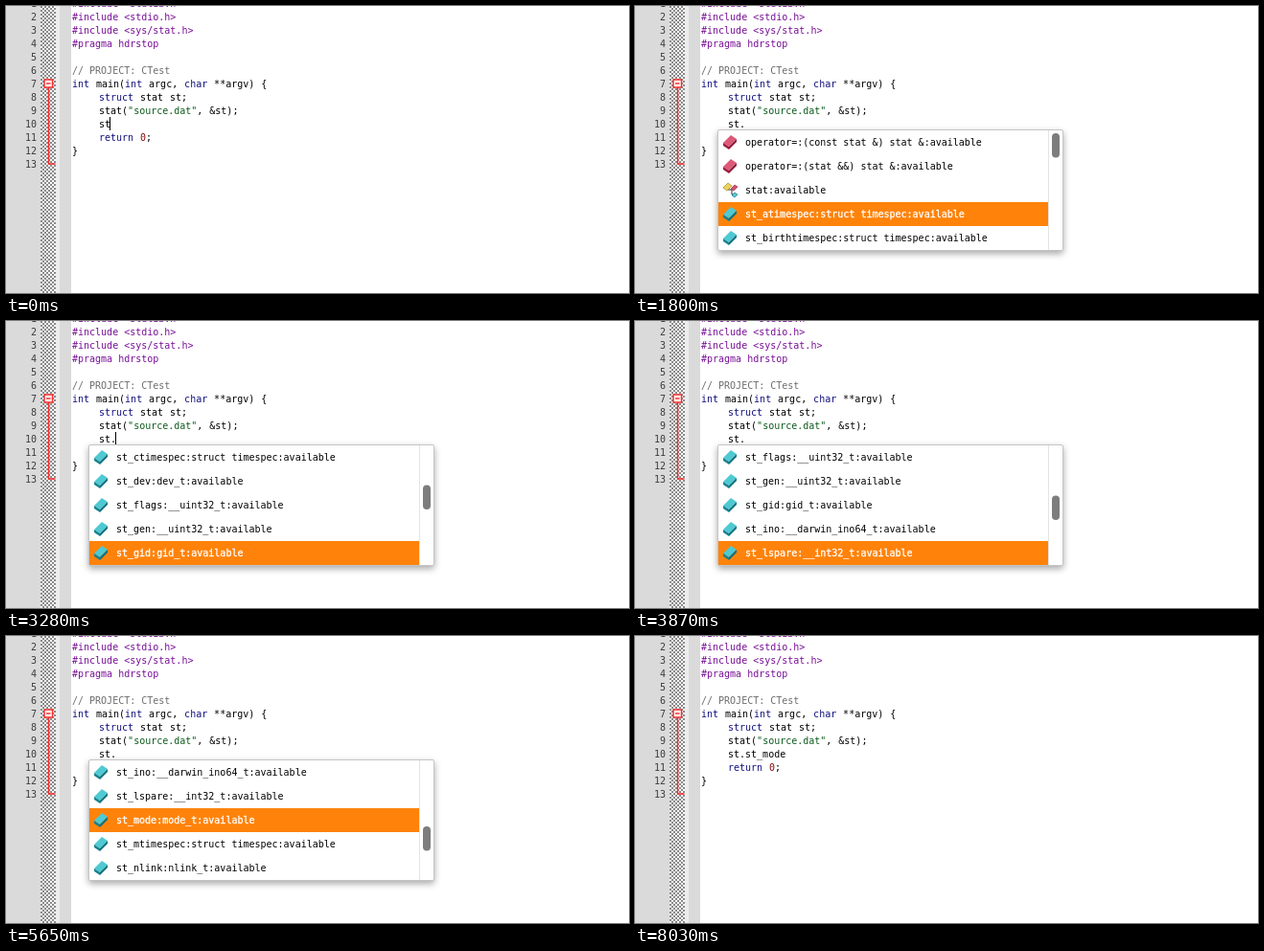
Animation, 650 px wide and 300 px high, one loop 8.05 s. Source, as an HTML page:

```html
<!DOCTYPE html>
<html lang="en">
<head>
<meta charset="utf-8">
<title>Code completion</title>
<style>
  html, body { margin: 0; width: 100%; height: 100%; overflow: hidden; background: #fff; }
  svg { display: block; width: 650px; height: 300px; }
  text { font: 10px "DejaVu Sans Mono", monospace; fill: #000; }
  .num { text-anchor: end; fill: #3c3c3c; }
  .code { word-spacing: .9px; }
  .pre { fill: #780f96; word-spacing: 0; }
  .note { fill: #6e6e6e; word-spacing: 0; }
  .key { fill: #10107f; }
  .str { fill: #0c5a1c; }
  .lit { fill: #8b0a0a; }
  .row.on text { fill: #fff; stroke: #fff; stroke-width: .3px; }
  .fold { fill: none; stroke: #f52f2f; stroke-width: 1.5; }
  #panel { filter: drop-shadow(0 3px 3.5px rgba(0, 0, 0, .34)); }
</style>
</head>
<body>
<svg viewBox="0 0 650 300">
  <defs>
    <pattern id="check" x="36" width="4" height="4" patternUnits="userSpaceOnUse">
      <rect width="4" height="4" fill="#fafafa"/>
      <path d="M0 0h2v2h-2zM2 2h2v2h-2z" fill="#8a8a8a"/>
    </pattern>
    <clipPath id="view"><rect x="87" y="130" width="344" height="125"/></clipPath>
    <g id="method">
      <path d="M92 143L100 135L106 139L98 147Z" fill="#dc5a78"/>
      <path d="M92 143L98 147V150L92 146Z" fill="#a01c40"/>
      <path d="M98 147L106 139V142L98 150Z" fill="#8a1836"/>
    </g>
    <g id="field">
      <path d="M92 143L100 135L106 139L98 147Z" fill="#4fc9d2"/>
      <path d="M92 143L98 147V150L92 146Z" fill="#16838f"/>
      <path d="M98 147L106 139V142L98 150Z" fill="#0f6f7c"/>
    </g>
    <g id="type">
      <path d="M97 142H101V147H104" fill="none" stroke="#333"/>
      <path d="M92 140L97 135L101 138L96 143Z" fill="#ecd35a" stroke="#a58a1e" stroke-width=".7"/>
      <path d="M100 141L104 137L107 139L103 143Z" fill="#d64f72" stroke="#8a1836" stroke-width=".6"/>
      <path d="M101 148L104 145L107 147L104 150Z" fill="#4fc9d2" stroke="#0f6f7c" stroke-width=".6"/>
    </g>
  </defs>

  <rect width="650" height="300" fill="#fff"/>
  <rect width="68" height="300" fill="#dadada"/>
  <rect x="36" width="16" height="300" fill="url(#check)"/>
  <rect x="52" width="4" height="300" fill="#ececec"/>
  <path class="fold" d="M44.5 85V165H51.5"/>
  <rect class="fold" x="40" y="77" width="8.5" height="8" style="fill:#fff"/>
  <path class="fold" d="M42 81H46.5"/>

  <g id="editor"></g>
  <rect id="caret" y="116" width="1" height="14"/>

  <g id="popup">
    <rect id="panel" x="86.5" y="129.5" width="360" height="126" rx="1.5" fill="#fff" stroke="#c4c4c4"/>
    <rect id="bar" x="87" width="344" height="25" fill="#ff830a"/>
    <g clip-path="url(#view)"><g id="list"></g></g>
    <path d="M431.5 130V255" stroke="#e4e4e4"/>
    <rect id="thumb" x="435" width="8" height="25.5" rx="4" fill="#7d7d7d"/>
  </g>
</svg>

<script>
const LOOP = 8050, OPEN = 750, CLOSE = 5790, ROW = 25, VISIBLE = 5;
const DOWN = [1500, 1650, 1800, 1950, 2100, 2250, 2400, 2840, 2990, 3130,
              3280, 3430, 3870, 4320, 4460, 4610];
const UP = [5050, 5200];
const BLINK = [750, 1200, 1800, 2250, 2690, 3280, 3730, 4170, 4610,
               5200, 5650, 6090, 6690, 7140, 7590];
const TYPED = [[0, 'st'], [150, 'st.'], [CLOSE, 'st.st_mode']];

// Each line: x, then [class, text] runs
const LINES = [
  [69, ['pre', '#include <stdlib.h>']],
  [69, ['pre', '#include <stdio.h>']],
  [69, ['pre', '#include <sys/stat.h>']],
  [69, ['pre', '#pragma hdrstop']],
  [69],
  [69, ['note', '// PROJECT: CTest']],
  [69, ['key', 'int'], ['', ' main('], ['key', 'int'], ['', ' argc, '], ['key', 'char'], ['', ' **argv) {']],
  [97, ['key', 'struct'], ['', ' stat st;']],
  [97, ['', 'stat('], ['str', '"source.dat"'], ['', ', &st);']],
  [97, ['', 'st']],
  [97, ['key', 'return'], ['', ' '], ['lit', '0'], ['', ';']],
  [69, ['', '}']],
  [69]
];

const ITEMS = [
  'operator=:(const stat &) stat &', 'operator=:(stat &&) stat &', 'stat',
  'st_atimespec:struct timespec', 'st_birthtimespec:struct timespec',
  'st_blksize:blksize_t', 'st_blocks:blkcnt_t', 'st_ctimespec:struct timespec',
  'st_dev:dev_t', 'st_flags:__uint32_t', 'st_gen:__uint32_t', 'st_gid:gid_t',
  'st_ino:__darwin_ino64_t', 'st_lspare:__int32_t', 'st_mode:mode_t',
  'st_mtimespec:struct timespec', 'st_nlink:nlink_t'
];

const $ = id => document.getElementById(id);

function add(parent, tag, attrs, content) {
  const el = document.createElementNS('http://www.w3.org/2000/svg', tag);
  for (const key in attrs) el.setAttribute(key, attrs[key]);
  if (content !== undefined) el.textContent = content;
  return parent.appendChild(el);
}

const lineTexts = LINES.map(([x, ...runs], i) => {
  const y = 1 + 14 * i;
  add($('editor'), 'text', { class: 'num', x: 32, y }, i + 1);
  const line = add($('editor'), 'text', { class: 'code', x, y, style: 'white-space:pre' });
  for (const [cls, str] of runs) add(line, 'tspan', { class: cls }, str);
  return line;
});
const typedRun = lineTexts[9].firstChild;

const rows = ITEMS.map((item, i) => {
  const row = add($('list'), 'g', { class: 'row', transform: `translate(0 ${i * ROW})` });
  const icon = i < 2 ? 'method' : i === 2 ? 'type' : 'field';
  add(row, 'use', { href: '#' + icon });
  add(row, 'text', { x: 115, y: 146 }, item + ':available');
  return row;
});

const passed = (times, t) => times.filter(time => time <= t).length;

function draw(t) {
  const typed = TYPED.filter(([time]) => time <= t).pop()[1];
  if (typedRun.textContent !== typed) typedRun.textContent = typed;
  $('caret').setAttribute('x', 96 + 6 * typed.length);
  $('caret').style.display = passed(BLINK, t) % 2 ? 'none' : '';

  const open = t >= OPEN && t < CLOSE;
  $('popup').style.display = open ? '' : 'none';
  if (!open) return;
  const lowest = passed(DOWN, t);
  const selected = lowest - passed(UP, t);
  const top = Math.max(0, lowest - VISIBLE + 1);
  $('list').setAttribute('transform', `translate(0 ${-top * ROW})`);
  $('bar').setAttribute('y', 130 + (selected - top) * ROW);
  $('thumb').setAttribute('y', 133 + top * 5.5);
  rows.forEach((row, i) => row.classList.toggle('on', i === selected));
}

const start = performance.now();
function tick() {
  draw((performance.now() - start) % LOOP);
  requestAnimationFrame(tick);
}
tick();
</script>
</body>
</html>
```
